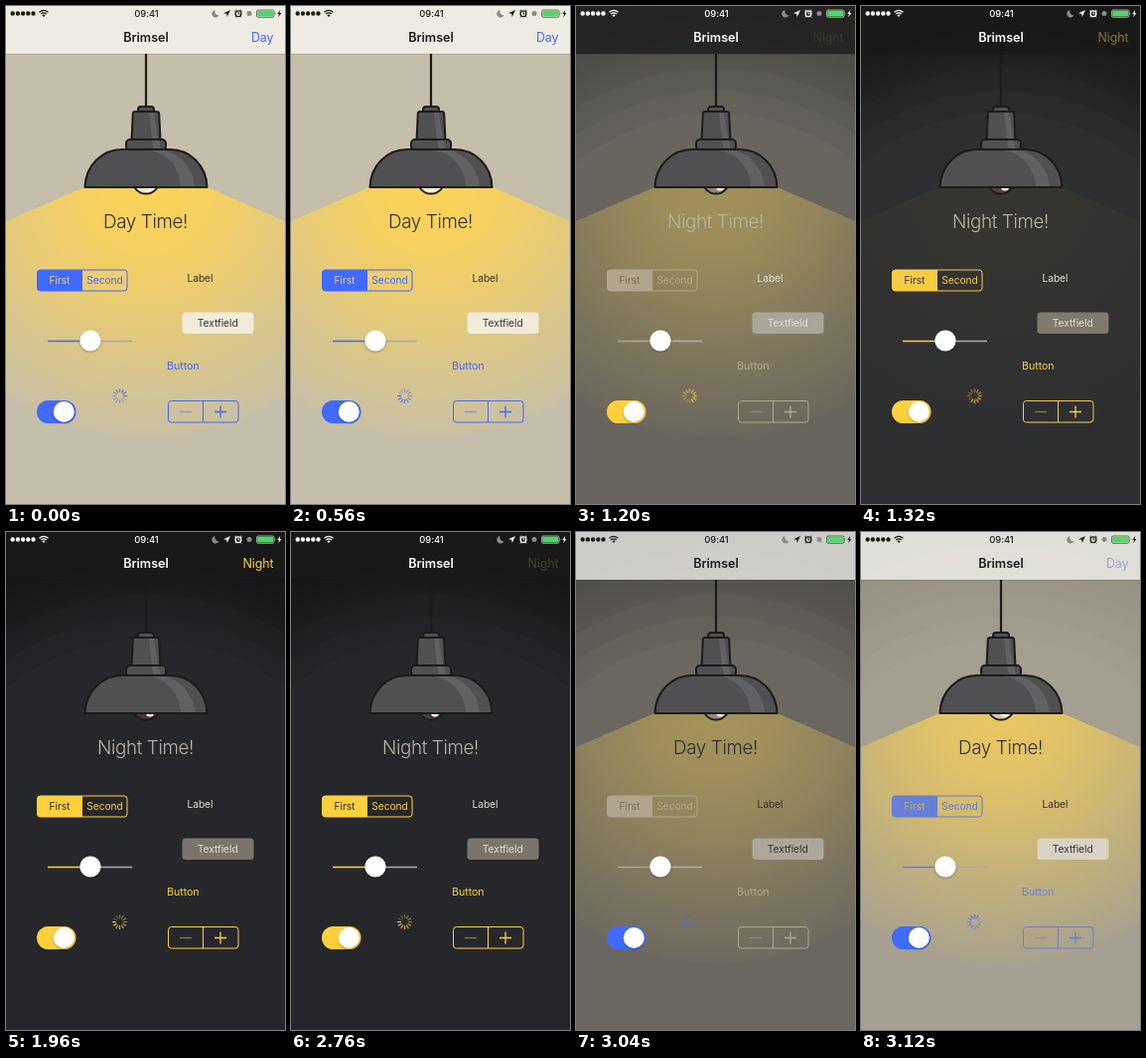
An HTML page for the animation above (3.16 s loop, 281x500 px).

```html
<!DOCTYPE html>
<html lang="en">
<head>
<meta charset="utf-8">
<title>Day and night theme</title>
<style>
/* Theme colours are registered so that keyframes can blend them. */
@property --tint { syntax: '<color>'; inherits: true; initial-value: #416aff }
@property --bg { syntax: '<color>'; inherits: true; initial-value: #c5beaa }
@property --field { syntax: '<color>'; inherits: true; initial-value: #f0ebda }
@property --pick { syntax: '<color>'; inherits: true; initial-value: #ebcf7c }
@property --bulb { syntax: '<color>'; inherits: true; initial-value: #fbf0c8 }
@property --lit { syntax: '<number>'; inherits: true; initial-value: 1 }
@property --dark { syntax: '<number>'; inherits: true; initial-value: 0 }

html, body { margin: 0; width: 100%; height: 100%; overflow: hidden; background: #c5beaa }
svg {
  display: block; width: 281px; height: 500px;
  font-family: Inter, Roboto, 'Liberation Sans', sans-serif;
  animation: fade 3160ms infinite, snap 3160ms step-end infinite;
}
text { font-size: 10.2px; letter-spacing: -.05px }
.mid { text-anchor: middle }
.end { text-anchor: end; font-size: 12.4px; fill: var(--tint) }
.big { text-anchor: middle; font-size: 18.8px; font-weight: 300; letter-spacing: -.35px; fill: var(--big) }
.ink { fill: var(--ink) }
.status { fill: var(--top); stroke: none }
.line { fill: none; stroke: var(--top) }
.tint { fill: var(--tint) }
.edge { fill: none; stroke: var(--tint) }
.metal { fill: #505052; stroke: #1c1b1b; stroke-width: 2; stroke-linejoin: round }
.shine { fill: #616163 }
.knob { fill: #fff; filter: drop-shadow(0 1.3px 1.3px rgba(0, 0, 0, .3)) }
#spin {
  stroke: var(--switch); stroke-width: 1.2; stroke-linecap: round;
  transform-origin: 114.5px 391.5px; animation: spin 3160ms infinite;
}
#dayBtn { animation: dayBtn 3160ms linear infinite }
#nightBtn { animation: nightBtn 3160ms linear infinite }

@keyframes fade {
  0%, 31.01% {
    --tint: #416aff; --bg: #c5beaa; --field: #f0ebda; --pick: #ebcf7c; --bulb: #fbf0c8;
    --lit: 1; --dark: 0; animation-timing-function: ease-in-out;
  }
  43.67%, 91.14% {
    --tint: #ffd03c; --bg: #26272a; --field: #7a746a; --pick: #2a2a2b; --bulb: #463e2e;
    --lit: 0; --dark: 1; animation-timing-function: cubic-bezier(.4, .12, .75, .625);
  }
  100% {
    --tint: #416aff; --bg: #c5beaa; --field: #f0ebda; --pick: #ebcf7c; --bulb: #fbf0c8;
    --lit: 1; --dark: 0;
  }
}
@keyframes snap {
  0%, 91.14%, 100% {
    --top: #1c1c1e; --ink: #333335; --big: #2e2e32; --switch: #416aff;
    --bar: rgba(253, 253, 247, .73); --day: 1; --night: 0;
  }
  31.65% {
    --top: #fff; --ink: #e2ded5; --big: #bab3a6; --switch: #ffd03c;
    --bar: rgba(25, 25, 26, .76); --day: 0; --night: 1;
  }
}
@keyframes spin {
  0% { transform: rotate(0); animation-timing-function: steps(18) }
  46.84%, 87.34% { transform: rotate(540deg); animation-timing-function: steps(5) }
  100% { transform: rotate(690deg) }
}
@keyframes dayBtn {
  0%, 27.84% { opacity: 1 }
  27.85%, 35.44% { opacity: .2 }
  36.7%, 96.2% { opacity: 0 }
  98.73% { opacity: .6 }
  100% { opacity: 1 }
}
@keyframes nightBtn {
  0%, 36.7% { opacity: 0 }
  37.97% { opacity: .12 }
  46.84%, 87.33% { opacity: 1 }
  87.34%, 91.13% { opacity: .2 }
  91.14%, 100% { opacity: 0 }
}
</style>
</head>
<body>
<svg viewBox="0 0 281 500">
  <defs>
    <radialGradient id="glow" gradientUnits="userSpaceOnUse" cx="141" cy="180" r="255">
      <stop offset="0" stop-color="#ffd453" stop-opacity=".96"/>
      <stop offset=".25" stop-color="#ffd453" stop-opacity=".84"/>
      <stop offset=".5" stop-color="#ffd453" stop-opacity=".6"/>
      <stop offset=".75" stop-color="#ffd453" stop-opacity=".32"/>
      <stop offset=".985" stop-color="#ffd453" stop-opacity=".08"/>
      <stop offset="1" stop-color="#ffd453" stop-opacity="0"/>
    </radialGradient>
    <radialGradient id="shade" gradientUnits="userSpaceOnUse" cx="141" cy="330" r="320">
      <stop offset=".69" stop-opacity="0"/>
      <stop offset=".7" stop-opacity=".08"/>
      <stop offset=".76" stop-opacity=".1"/>
      <stop offset=".77" stop-opacity=".18"/>
      <stop offset=".83" stop-opacity=".2"/>
      <stop offset=".84" stop-opacity=".28"/>
      <stop offset="1" stop-opacity=".45"/>
    </radialGradient>
  </defs>

  <rect width="281" height="500" style="fill:var(--bg)"/>
  <rect width="281" height="500" fill="url(#shade)" style="opacity:var(--dark)"/>
  <path d="M79 182H203L281 216V500H0V216Z" fill="url(#glow)" style="opacity:var(--lit)"/>

  <!-- lamp -->
  <path d="M141 48V102" stroke="#1c1b1b" stroke-width="2.2"/>
  <circle cx="141" cy="175" r="13.5" stroke="#1c1b1b" stroke-width="1.8" style="fill:var(--bulb)"/>
  <circle cx="145" cy="181.500" r="4" fill="#fff"/>
  <rect class="metal" x="133" y="101" width="16" height="8" rx="3"/>
  <path class="metal" d="M130 106H152Q154 106 154.200 108L155.500 135H126.500L127.800 108Q128 106 130 106Z"/>
  <path class="shine" d="M144 107H149L153 133H147Z"/>
  <rect class="metal" x="121" y="134" width="40" height="11" rx="4"/>
  <path class="shine" d="M147 135H154L156 144H149Z"/>
  <path class="metal" d="M79.500 182C80 160 97 144 117 144H165C185 144 202 160 202.500 182Z"/>
  <path class="shine" d="M145 145H159C177 149 188 163 190 181H176C175 163 163 148 145 145Z"/>

  <g style="opacity:var(--day)"><text class="big" x="140.500" y="223">Day Time!</text></g>
  <g style="opacity:var(--night)"><text class="big" x="140.500" y="223">Night Time!</text></g>

  <!-- controls -->
  <path class="tint" d="M77 265H34.500a3 3 0 0 0-3 3V283a3 3 0 0 0 3 3H77Z"/>
  <rect class="edge" x="31.500" y="265" width="90.500" height="21" rx="3"/>
  <text class="mid" x="54" y="279" style="fill:var(--pick)">First</text>
  <text class="mid tint" x="99.500" y="279">Second</text>

  <text class="ink" x="182.500" y="276.500">Label</text>
  <rect x="177.500" y="307.500" width="72" height="21.500" rx="3.500" style="fill:var(--field)"/>
  <text class="mid ink" x="213.200" y="322">Textfield</text>

  <path d="M85 336.500H127" stroke="#a9abb0" stroke-width="1.400"/>
  <path class="edge" d="M42 336.500H85" stroke-width="1.400"/>
  <circle class="knob" cx="85" cy="336" r="10.600"/>

  <text class="tint" x="162" y="364.700" style="font-size:10.700px">Button</text>

  <rect x="31" y="396" width="39.500" height="23" rx="11.500" style="fill:var(--switch)"/>
  <circle class="knob" cx="58.300" cy="407.400" r="10.500"/>

  <g id="spin"></g>

  <rect class="edge" x="163.500" y="396.500" width="70.500" height="21.500" rx="3"/>
  <path class="edge" d="M198.500 396.500V418"/>
  <path class="edge" d="M175 407.500H187" opacity=".5" stroke-width="1.200"/>
  <path class="edge" d="M210 407.500H222M216 401.500V413.500" stroke-width="1.300"/>

  <!-- bar -->
  <rect width="281" height="48" style="fill:var(--bar)"/>
  <path d="M0 48.250H281" stroke="#000" stroke-opacity=".25" stroke-width=".6"/>
  <text class="mid status" x="141" y="36" style="font-size:12.600px;font-weight:600">Brimsel</text>
  <g id="dayBtn"><text class="end" x="269.500" y="36">Day</text></g>
  <g id="nightBtn"><text class="end" x="269.500" y="36">Night</text></g>

  <path class="line" d="M6.700 7.500H28" stroke-width="4.400" stroke-linecap="round" stroke-dasharray="0 5.200"/>
  <path class="line" d="M33.500 6.200Q38 2.400 42.500 6.200M35.200 8Q38 5.800 40.800 8" stroke-width="1.300"/>
  <path class="status" d="M36.400 9.200Q38 8 39.600 9.200L38 11Z"/>
  <text class="mid status" x="141.500" y="11" style="font-size:9.400px;font-weight:500">09:41</text>
  <path d="M210.500 4A3.800 3.800 0 1 0 214.500 9.300A4 4 0 0 1 210.500 4Z" fill="#8b8b8d"/>
  <path class="status" d="M226 4L222.700 11L222.200 7.800L219 7.300Z"/>
  <circle class="line" cx="234" cy="7.700" r="2.900" stroke-width="1.300"/>
  <path class="line" d="M234 6V7.900H235.500M230.300 5.300L232 3.800M236 3.800L237.700 5.300M231.700 10.500L231 11.500M236.300 10.500L237 11.500" stroke-width=".9"/>
  <circle cx="245" cy="7.500" r="2.500" fill="#8b8b8d"/>
  <rect class="line" x="252.500" y="4" width="17.500" height="7.300" rx="1.500" stroke-width=".6"/>
  <rect x="253.300" y="4.800" width="15.900" height="5.700" rx=".8" fill="#4cd964"/>
  <path class="status" d="M270.700 6.300Q272 7.600 270.700 9ZM276.300 3.800L273.300 8.100H275L274.300 11.300L277.400 6.900H275.600Z"/>
</svg>
<script>
const spin = document.getElementById('spin');
const head = 3;
for (let i = 0; i < 12; i++) {
  const spoke = document.createElementNS(spin.namespaceURI, 'path');
  spoke.setAttribute('d', 'M114.500 387.500V384.500');
  spoke.setAttribute('transform', `rotate(${i * 30} 114.500 391.500)`);
  spoke.setAttribute('opacity', 1 - (head - i + 12) % 12 * .065);
  spin.append(spoke);
}
</script>
</body>
</html>
```
